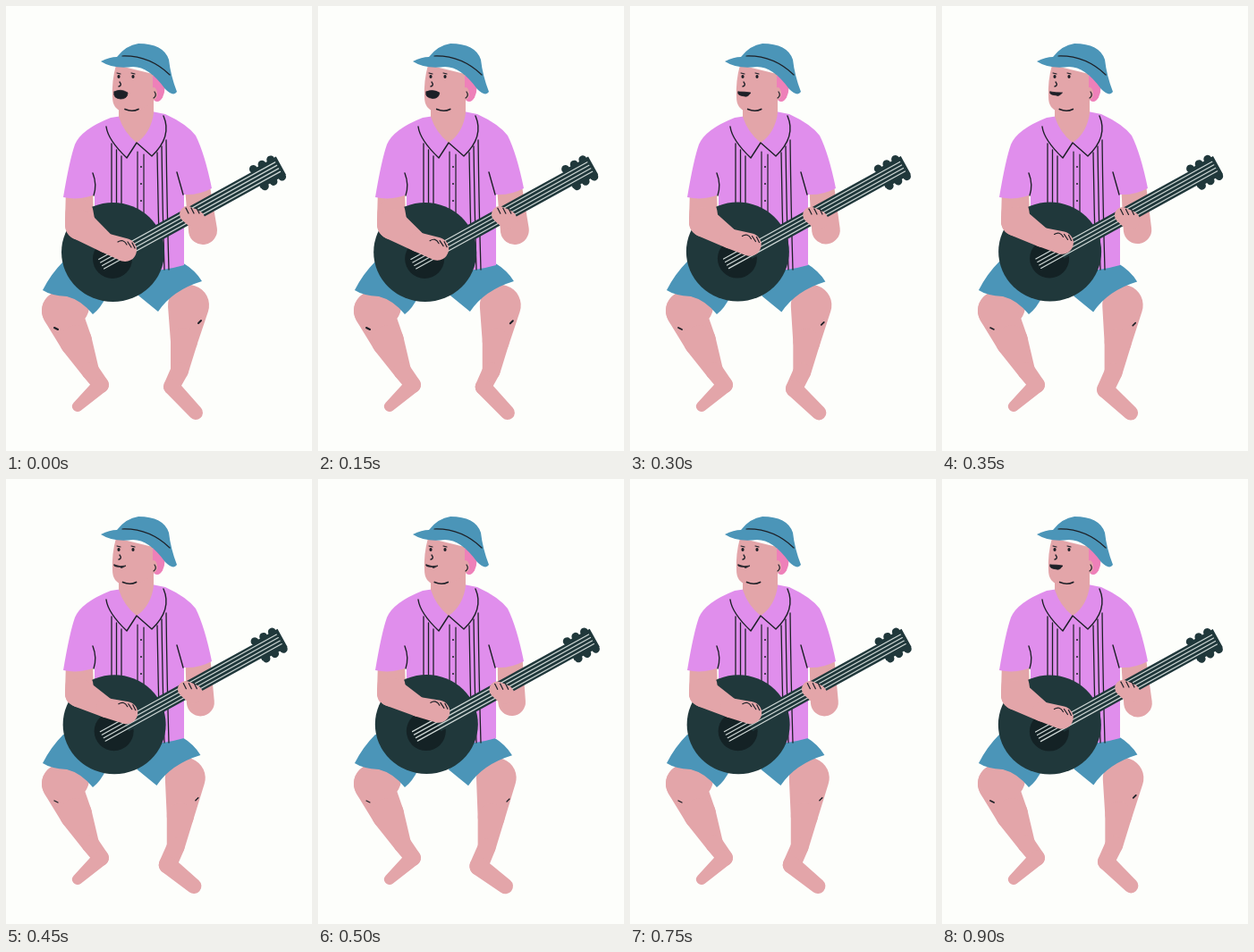
An HTML page with a canvas for the animation above (0.95 s loop, 342x498 px).

```html
<!DOCTYPE html>
<html lang="en">
<head>
<meta charset="utf-8">
<title>Guitar player</title>
<style>
html, body { margin: 0; width: 100%; height: 100%; overflow: hidden; background: #fdfefb; }
canvas { display: block; }
</style>
</head>
<body>
<canvas id="stage" width="342" height="498"></canvas>
<script>
const ctx = document.getElementById('stage').getContext('2d');
const SKIN = '#e3a5a9', SHIRT = '#e08eec', BLUE = '#4b95b8', WOOD = '#20383b', HOLE = '#142225',
      INK = '#1d2027', PINK = '#ee80b9', PAPER = '#fdfefb', STRING = '#cfd8d6';
const LOOP = 950, STEP = 50, TURN = 600;

const mix = (a, b, k) => a + (b - a) * k;

function fill(color, path) {
  ctx.fillStyle = color;
  ctx.fill(new Path2D(path));
}

function stroke(path, width = 1.4, color = INK) {
  ctx.lineWidth = width;
  ctx.strokeStyle = color;
  ctx.stroke(new Path2D(path));
}

function oval(color, x, y, rx, ry = rx) {
  ctx.beginPath();
  ctx.ellipse(x, y, rx, ry, 0, 0, 7);
  ctx.fillStyle = color;
  ctx.fill();
}

// Chain of round joints [x, y, radius], each pair joined by its outer tangents.
function limb(from, to = from, k = 0) {
  const joints = from.map((joint, i) => joint.map((v, j) => mix(v, to[i][j], k)));
  ctx.fillStyle = SKIN;
  for (let i = 1; i < joints.length; i++) {
    const [x, y, r] = joints[i - 1], [X, Y, R] = joints[i];
    const heading = Math.atan2(Y - y, X - x);
    const side = Math.acos((r - R) / Math.hypot(X - x, Y - y));
    ctx.beginPath();
    ctx.arc(x, y, r, heading + side, heading - side);
    ctx.arc(X, Y, R, heading - side, heading + side);
    ctx.fill();
  }
}

function drawLegs(k) {
  limb([[70, 336, 23], [62, 341, 22], [78, 375, 18], [94, 408, 10], [106, 424, 9], [80, 448, 6]]);
  limb([[204, 335, 23], [199, 375, 15], [194, 408, 10], [185, 426, 9], [212, 455, 8]],
       [[197, 334, 22], [191, 380, 15], [186, 414, 10], [177, 437, 11], [208, 456, 9]], k);
  const mark = mix(2, 0.8, k);
  stroke('M54 360l4 2', mark);
  stroke(`M${mix(215, 209, k)} ${mix(355, 364, k)}l3 -3`, mark);
}

function drawShorts(k) {
  fill(BLUE, 'M64 286Q50 300 41 318Q50 324 68 325Q84 329 97 345Q106 338 112 325L110 288Z');
  ctx.save();
  ctx.translate(-3 * k, 2 * k);
  fill(BLUE, 'M148 324L170 342Q186 318 219 308Q212 296 197 287H165Z');
  ctx.restore();
}

function drawShirt() {
  fill(SHIRT, 'M117 125Q84 138 77 155Q71 172 64 214Q82 218 99 211V290Q150 304 199 290V211Q215 212 230 204Q222 165 212 145Q202 132 178 121L163 118Z');
  stroke('M97 187Q102 200 98 212M191 186L198 211');
  for (let i = 0; i < 3; i++) {
    stroke(`M${118 + i * 5.5} ${154 + i * 7}v68`, 1.3);
    stroke(`M${169 + i * 5} ${164 - i * 7}Q${170 + i * 5} 230 ${172 + i * 5} 295`, 1.3);
  }
  stroke('M147 163V228M154 166V232', 1.2);
  for (let y = 180; y < 220; y += 19) oval(INK, 151, y, 1);
}

function drawHead(k) {
  fill(SKIN, 'M126 110V124Q132 142 146 153Q162 142 165 120V100Z');
  oval(PINK, 169, 91, 8.5, 16);
  fill(SKIN, 'M123 66Q118 84 119 102Q119 115 130 118Q146 121 164 108V76Z');
  oval(SKIN, 165, 98, 4, 7);
  stroke('M166 96q3 4 -1 7', 1.2);
  stroke('M112 135Q114 150 135 170L146 153L163 168Q186 146 176 123');
  stroke(`M${mix(133, 130, k)} 115.5q8 3.5 15 0`, 1.7);
  fill(BLUE, 'M106 62Q116 57 124 57Q134 44 148 42Q176 42 182 60Q184 78 191 96Q187 102 178 93Q160 68 142 68Q120 71 106 62Z');
  stroke('M130 56Q160 55 183 77', 1.2);
  for (const x of [126, 142]) {
    oval(INK, x, 79, 1.6, 2);
    stroke(`M${x - 2} 75l4 1`, 1.1);
  }
  stroke('M127 85q3 4 -1 5', 1.3);
  const open = Math.max(0, 1 - 1.3 * k), right = mix(134, 136, open);
  const mouth = `M121 96Q128 ${mix(99, 92, open)} ${right} 97Q${mix(128, 136, open)} ${mix(101, 104, open)} 128 ${mix(98.5, 104, open)}Q119 ${mix(98, 103, open)} 121 96Z`;
  fill(INK, mouth);
  stroke(mouth, 0.8);
}

// The neck is drawn along a tilted axis that starts at the sound hole.
function drawGuitar(k) {
  ctx.save();
  ctx.translate(2 * k, -k);
  oval(WOOD, 119.5, 275.5, 57.5, 55.5);
  oval(HOLE, 119, 283, 22);
  ctx.translate(118, 282.5);
  ctx.rotate(-0.504);
  fill(WOOD, 'M15 -9H184V-11H216V12H184V9H15Z');
  for (let x = 187; x < 212; x += 11) {
    oval(WOOD, x, -11, 4.5);
    oval(WOOD, x + 2, 12, 4.5);
  }
  for (let y = -6; y < 8; y += 4) stroke(`M-13 ${y}H212`, 1.2, STRING);
  ctx.restore();
}

function drawFrettingHand(k) {
  limb([[203, 233, 9], [212, 239, 10.5]], [[199, 237, 9], [207, 242, 11]], k);
  for (let x = 0; x < 15; x += 6)
    stroke(`M${mix(201, 196, k) + x} ${mix(226, 231, k)}l3 6`, 1.2);
}

function drawForearm(k) {
  limb([[82, 231, 15.5], [83, 245, 17], [111, 265, 11], [133, 273, 13]],
       [[82, 231, 15.5], [82, 238, 16], [112, 254, 11], [135, 259, 12.5]], k);
  const x = mix(125, 126, k), y = mix(264, 249, k);
  stroke(`M${x} ${y}q6 -4 10 3m1 -3l4 6m1 -5l3 6`, 1.2);
}

function draw(now) {
  const time = Math.floor(now % LOOP / STEP) * STEP;
  const along = Math.min(time, 2 * TURN - time);
  const u = Math.max(0, along - STEP) / (TURN - STEP);
  const slow = u * u, even = u * u * (3 - 2 * u);
  ctx.fillStyle = PAPER;
  ctx.fillRect(0, 0, 342, 498);
  ctx.lineCap = ctx.lineJoin = 'round';
  drawLegs(slow);
  drawShorts(slow);
  limb([[82, 205, 15], [82, 240, 16]]);
  limb([[214, 203, 14], [220, 251, 16]], [[215, 203, 14], [215, 249, 15]], slow);
  drawShirt();
  drawHead(even);
  drawGuitar(even);
  drawFrettingHand(slow);
  drawForearm(even);
}

const start = performance.now();
function tick() {
  draw(performance.now() - start);
  requestAnimationFrame(tick);
}
tick();
</script>
</body>
</html>
```
